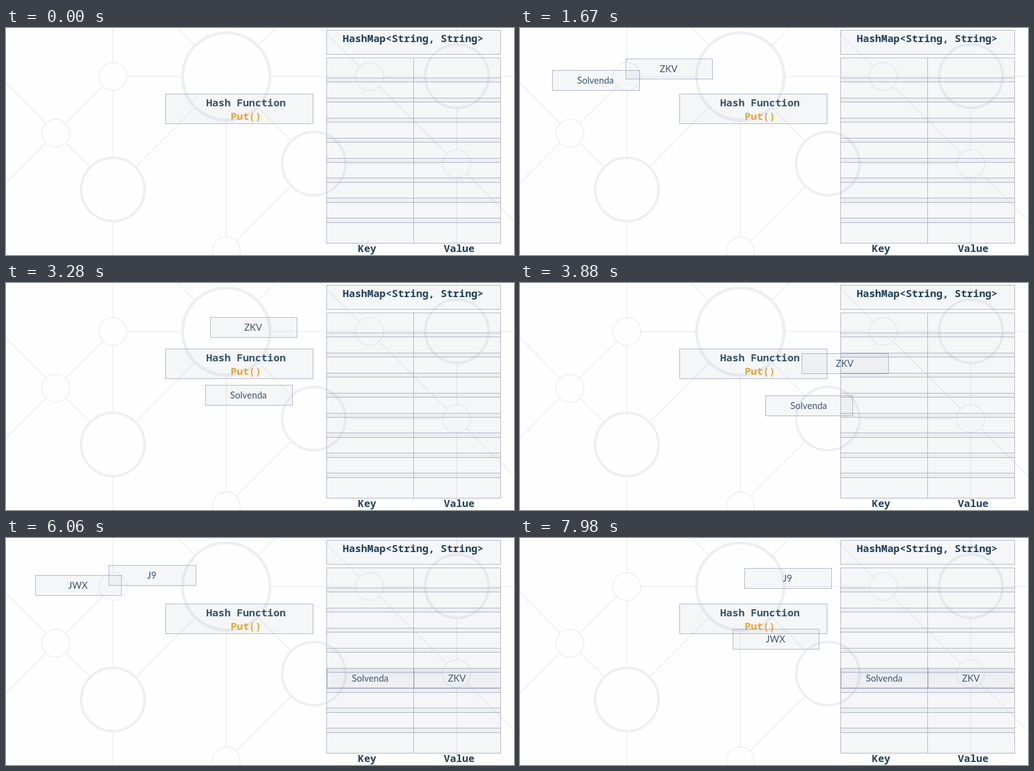
These frames come from a looping animation (1010 px wide and 452 px high, 8 s). An HTML page with a canvas:

```html
<!DOCTYPE html>
<html lang="en">
<head>
<meta charset="utf-8">
<title>HashMap put</title>
<style>
  html, body { margin: 0; width: 100%; height: 100%; overflow: hidden; background: #fefefe; }
  canvas { display: block; }
</style>
</head>
<body>
<canvas id="stage" width="1010" height="452"></canvas>
<script>
const LOOP = 8000;
const ctx = document.getElementById('stage').getContext('2d');
const MONO = 'bold 20.3px "Noto Sans Mono", monospace';
const TILE_FONT = '18.3px Lato, sans-serif';

// Each pair fades in, passes the hash function, then flies to its row.
// Waypoints are the top left corners of a tile.
const pairs = [
  { show: 540, fade: 500, stepFrom: 580, step: 76.7, moves: [[1155, 1745], [3095, 1770]],
    tiles: [
      { text: 'Solvenda', w: 173, path: [[0, 60.5], [391, 202], [638, 259]] },
      { text: 'ZKV', w: 172, path: [[173.6, 60], [398, 64], [811, 259]] }
    ] },
  { show: 5440, fade: 500, stepFrom: 5500, step: 77.4, moves: [[5574, 1745], [7553, 1745]],
    tiles: [
      { text: 'JWX', w: 171, path: [[2, 53.5], [394, 196], [638, 70]] },
      { text: 'J9', w: 173, path: [[172, 53], [397, 57], [811, 82]] }
    ] }
];

const clamp = v => Math.min(1, Math.max(0, v));
const ease = u => u < 0.5 ? 2 * u * u : 1 - 2 * (1 - u) * (1 - u);

function box(x, y, w, h) {
  ctx.fillStyle = 'rgba(80, 105, 130, 0.05)';
  ctx.fillRect(x, y, w + 1, h + 1);
  ctx.strokeStyle = '#a0a8be';
  ctx.lineWidth = 1;
  ctx.strokeRect(x + 0.5, y + 0.5, w, h);
}

function label(text, x, y, color, font = MONO) {
  ctx.font = font;
  ctx.fillStyle = color;
  ctx.textAlign = 'center';
  ctx.fillText(text, x, y);
}

function ring(x, y, r, width) {
  ctx.lineWidth = width;
  ctx.beginPath();
  ctx.arc(x, y, r, 0, 2 * Math.PI);
  ctx.stroke();
}

function drawNetwork() {
  ctx.fillStyle = '#fefefe';
  ctx.fillRect(0, 0, 1010, 452);
  ctx.strokeStyle = '#eeeff3';
  ring(438, 96.5, 87, 6);
  for (const [x, y] of [[896.5, 96], [612, 270], [212.5, 321.5]]) ring(x, y, 63, 5);
  for (const [x, y] of [[212.5, 96.5], [722.5, 96.5], [99, 209.5], [896, 270], [438, 444]]) ring(x, y, 27.7, 2);
  const path = new Path2D(`M212.5 0V68M212.5 125V257M212.5 387V452
    M241 96.5H348M528 96.5H694M751 96.5H831M962 96.5H1010
    M438 186V416M896 0V31M896 161V242M896 298V452M677 270H868
    M0 109L79 189M119 229L169 278M0 309L79 229M119 189L193 116
    M257 278L377 157M500 157L568 226M568 314L458 424
    M341 0L377 36M500 36L536 0M625 0L702 76M742 116L876 250M916 290L1010 384`);
  ctx.lineWidth = 2;
  ctx.stroke(path);
}

function drawTable() {
  box(637, 4, 346, 48);
  for (let row = 0; row < 9; row++) {
    const top = Math.round(59 + 39.9 * row);
    const height = 107 + 40 * row + (row === 8) - top;
    box(637, top, 173, height);
    box(810, top, 173, height);
  }
  label('HashMap<String, String>', 809.5, 28, '#1f3f5f');
  label('Key', 718, 446, '#1f3f5f');
  label('Value', 901, 446, '#1f3f5f');
}

function drawHashBox() {
  box(317, 131, 293, 59);
  label('Hash Function', 477, 156, '#36536f');
  label('Put()', 477, 183, '#f0a52c');
}

function drawPair({ show, fade, stepFrom, step, moves, tiles }, time) {
  if (time < stepFrom) return;
  const t = stepFrom + step * Math.floor((time - stepFrom) / step);
  const [a, b] = moves.map(([start, length]) => ease(clamp((t - start) / length)));
  ctx.globalAlpha = clamp((t - show) / fade);
  for (const { text, w, path: [from, mid, to] } of tiles) {
    const [x, y] = [0, 1].map(i =>
      Math.round(from[i] + (mid[i] - from[i]) * a + (to[i] - mid[i]) * b));
    box(x, y, w, 40);
    label(text, x + w / 2 - 0.5, y + 27, '#3f5874', TILE_FONT);
  }
  ctx.globalAlpha = 1;
}

function draw() {
  const time = performance.now() % LOOP;
  drawNetwork();
  drawTable();
  drawHashBox();
  for (const pair of pairs) drawPair(pair, time);
  requestAnimationFrame(draw);
}
draw();
</script>
</body>
</html>
```
